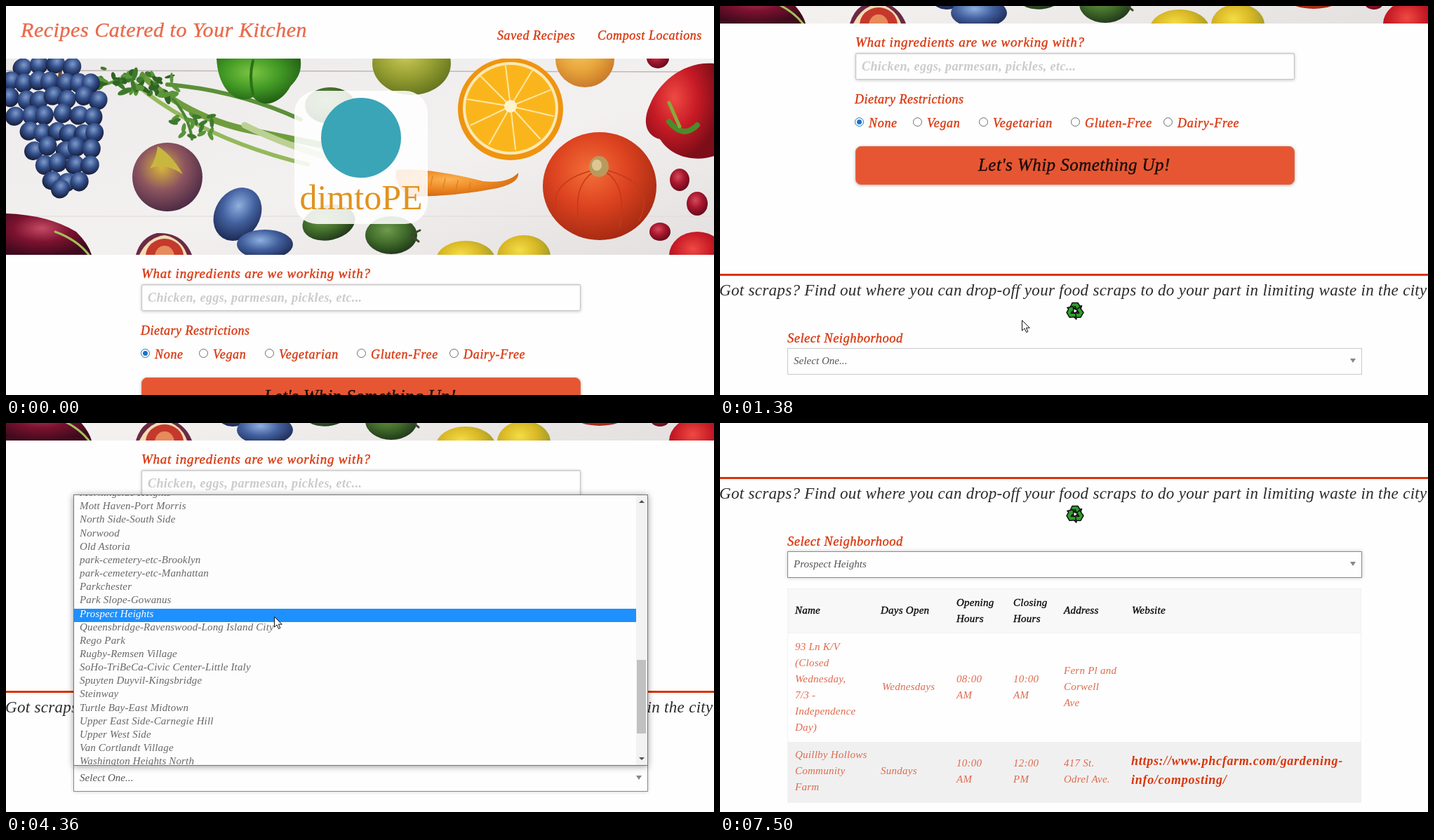
Animation of 1009x555 px, one loop 8.04 s. Source, as an HTML page:

```html
<!DOCTYPE html>
<html lang="en">
<head>
<meta charset="utf-8">
<title>Recipes Catered to Your Kitchen</title>
<style>
html, body { margin: 0; width: 100%; height: 100%; overflow: hidden; background: #fefefe; }
body { position: relative; font-family: "Liberation Serif", "Times New Roman", serif; font-style: italic; }
#page { position: absolute; left: 0; top: 0; width: 1009px; height: 1400px; }
#page > *, #list > *, #table > * { position: absolute; box-sizing: border-box; }
.t { line-height: 24px; white-space: pre; }
.mid { -webkit-text-stroke: .35px currentColor; }
.bold { font-weight: bold; }
#banner { left: 0; top: 75px; }
#field { left: 193px; top: 397px; width: 626px; height: 38px; border: 1px solid #c6c6c6; border-radius: 2px;
  background: #fefefe; box-shadow: inset 0 1px 2px rgba(10,10,10,.12), 0 1px 4px rgba(0,0,0,.22); }
#button { left: 193px; top: 530px; width: 626px; height: 55px; border-radius: 8px; background: #e75632;
  border: 1px solid #dc6a4c; box-shadow: 0 1px 4px rgba(0,0,0,.3); }
.radio { width: 13px; height: 13px; border: 1px solid #6b6b6b; border-radius: 50%; background: #fff; }
.radio.on { border-color: #1873c9; }
.radio.on::after { content: ""; position: absolute; inset: 2px; border-radius: 50%; background: #1873c9; }
#rule { left: 0; top: 712px; width: 1009px; height: 3px; background: #d93309; }
#select { left: 96px; top: 818px; width: 819px; height: 38px; border: 1px solid #cacaca; background: #fefefe; }
#select.focus { border-color: #8a8a8a; box-shadow: 0 0 5px #cacaca; }
#list { left: 96px; top: 432px; width: 819px; height: 387px; border: 1px solid #767676; background: #fff;
  overflow: hidden; box-shadow: 0 1px 9px rgba(0,0,0,.4); background: #fdfdfd; }
#rows { left: 0; top: 0; width: 801px; }
.row { height: 19.16px; padding-left: 8px; font-size: 15px; line-height: 15.5px; letter-spacing: .15px; color: #686868; white-space: pre; }
.row.hot { background: #1e90ff; color: #fff; }
#bar { right: 0; top: 0; width: 16px; height: 100%; background: #f2f2f2; }
#thumb { right: 2px; width: 13px; height: 105px; background: #c1c1c1; }
#table { left: 96px; top: 871px; width: 818px; height: 306px; border: 1px solid #f0f0f0; }
#head { left: 0; top: 0; width: 816px; height: 63px; background: #f8f8f8; border-bottom: 1px solid #f0f0f0; }
#band { left: 0; top: 218px; width: 816px; height: 86px; background: #f0f0f0; }
#cursor { position: absolute; left: 0; top: 0; overflow: visible; }
</style>
</head>
<body>
<div id="page">
  <svg id="banner" width="1009" height="280" viewBox="0 75 1009 280"></svg>
  <div id="field"></div>
  <div id="button"></div>
  <div id="rule"></div>
  <svg id="recycle" style="left:492px;top:751px" width="28" height="28" viewBox="-14 -14 28 28"></svg>
  <div id="select"></div>
  <svg style="left:898px;top:833px" width="8" height="6"><path d="M0 0h8L4 6z" fill="#868686"/></svg>
  <div id="table"><div id="head"></div><div id="band"></div></div>
</div>
<svg id="cursor" width="12" height="19"><path d="M.5 .5V15.2L4 12l2.6 5.6 2.3-1-2.5-5.4h4.9z" fill="#fff" stroke="#111"/></svg>
<script>
const $ = id => document.getElementById(id);
const page = $('page'), table = $('table');
const RED = '#d8350c', PALE = '#e06a4e';

function add(parent, cls, style = {}, text = '') {
  const el = document.createElement('div');
  el.className = cls;
  el.textContent = text;
  Object.assign(el.style, style);
  parent.append(el);
  return el;
}
// y is the middle of the capitals
const text = (x, y, str, size, gap, color, cls = 'mid', parent = page) =>
  add(parent, 't ' + cls, { left: x + 'px', top: y - 12 + 'px', fontSize: size + 'px', letterSpacing: gap + 'px', color }, str);

text(21, 34, 'Recipes Catered to Your Kitchen', 30, .55, '#e8694a');
text(700, 41.5, 'Saved Recipes', 18, .6, RED);
text(843, 41.5, 'Compost Locations', 18, .55, RED);
text(193, 381.5, 'What ingredients are we working with?', 19, .75, RED);
text(202, 415.5, 'Chicken, eggs, parmesan, pickles, etc...', 18, .4, '#cbcbcb', 'bold');
text(192, 463, 'Dietary Restrictions', 18, .5, RED);
[[192, 'None'], [275, 'Vegan'], [369, 'Vegetarian'], [500, 'Gluten-Free'], [632, 'Dairy-Free']].forEach(([x, s], i) => {
  add(page, i ? 'radio' : 'radio on', { left: x + 'px', top: '489px' });
  text(x + 20, 496.5, s, 18, .7, RED);
});
text(368, 557, "Let's Whip Something Up!", 25, .45, '#150c0a');
text(-1, 736, 'Got scraps? Find out where you can drop-off your food scraps to do your part in limiting waste in the city', 23, .31, '#2b2b2b', '');
text(96, 804, 'Select Neighborhood', 18.5, .5, RED);
const value = text(105, 836, '', 15, .05, '#555', '');

// table cells: x, middle of the cell, lines
const cells = (y, size, color, cls, list) => list.forEach(([x, str]) => {
  const lines = str.split('|');
  lines.forEach((s, i) => text(x - 97, y + (i - (lines.length - 1) / 2) * 23 - 237, s, size, .25, color, cls, table));
});
cells(267, 15, '#0a0a0a', 'mid', [[107, 'Name'], [229, 'Days Open'], [337, 'Opening|Hours'], [418, 'Closing|Hours'], [490, 'Address'], [587, 'Website']]);
cells(376, 15, PALE, '', [[107, '93 Ln K/V|(Closed|Wednesday,|7/3 -|Independence|Day)'], [231, 'Wednesdays'], [337, '08:00|AM'], [418, '10:00|AM'], [490, 'Fern Pl and|Corwell|Ave']]);
cells(496, 15, PALE, '', [[107, 'Quillby Hollows|Community|Farm'], [229, 'Sundays'], [337, '10:00|AM'], [418, '12:00|PM'], [490, '417 St.|Odrel Ave.']]);
const links = ['https://www.phcfarm.com/gardening-', 'info/composting/'].map((s, i) =>
  text(489, 245 + i * 26.5, s, 18, .72, RED, 'bold', table));

$('recycle').innerHTML = [0, 120, 240].map(a =>
  `<path transform="rotate(${a})" d="M-8 -3L-4 -11.5H4L7 -6.5 9.5 -7.5 7 1 -1 -3 1.5 -4 0 -6.5 -3 -1z" fill="#2f9e2c" stroke="#111" stroke-width="1.5" stroke-linejoin="round"/>`).join('');

// ---- banner ----
const tones = {
  grape: ['#7f9bc9', '#34508c', '#151b36'], plum: ['#8fb0e0', '#43619f', '#1e2b55'], fig: ['#d9b63c', '#8d5560', '#4b2a44'],
  pepper: ['#7cc544', '#439a25', '#1f5c14'], pear: ['#cdc95a', '#9aa334', '#66751f'], peach: ['#f4c55b', '#e9a63c', '#c97a2a'],
  red: ['#ee4a43', '#c81b26', '#7d0d18'], pumpkin: ['#f4703a', '#dd4320', '#a52a12'], berry: ['#d54a5c', '#a8162d', '#640a1a'],
  guava: ['#6f9a4e', '#45702d', '#20391a'], lemon: ['#f3dd45', '#d9b826', '#92952a'], beet: ['#c44a63', '#7d1230', '#3f0a1d'], carrot: ['#fbb254', '#ee8a25', '#cf6712']
};
const defs = Object.entries(tones).map(([id, c]) =>
  `<radialGradient id="${id}" cx=".42" cy=".36" r=".66">${c.map((k, i) => `<stop offset="${i / 2}" stop-color="${k}"/>`).join('')}</radialGradient>`).join('');
const oval = (x, y, rx, ry, tone, turn = 0) =>
  `<ellipse cx="${x}" cy="${y}" rx="${rx}" ry="${ry}" fill="${tone[0] == '#' ? tone : `url(#${tone})`}" transform="rotate(${turn} ${x} ${y})"/>`;
const shape = (d, tone) => `<path d="${d}" fill="${tone[0] == '#' ? tone : `url(#${tone})`}"/>`;
const line = (d, color, w) => `<path d="${d}" fill="none" stroke="${color}" stroke-width="${w}" stroke-linecap="round"/>`;
let seed = 7;
const rnd = () => (seed = seed * 16807 % 2147483647) / 2147483647;

let art = `<defs>${defs}<linearGradient id="wood" x2="1" y2="1"><stop stop-color="#eceaea"/><stop offset=".55" stop-color="#f3f1f0"/><stop offset="1" stop-color="#e3dfdf"/></linearGradient></defs>
<rect y="75" width="1009" height="280" fill="url(#wood)"/>`;
art += line('M0 92L1009 94', '#bdb8b5', 1.5) + line('M0 300H1009', '#dedad8', 1);
// celery and leaves
art += line('M195 100Q260 160 350 178T480 205', '#6f9d3d', 9) + line('M185 112Q280 190 430 226', '#94b95b', 6)
  + line('M230 112Q330 120 420 162', '#5b9038', 6) + line('M225 120Q260 150 265 190', '#4d8433', 4) + line('M340 170Q400 200 480 222', '#bcd094', 9);
for (let i = 0; i < 46; i++) {
  const a = rnd(), x = 135 + a * 110, y = 84 + rnd() * 34 + a * 14;
  art += oval(x, y, 4 + rnd() * 7, 2 + rnd() * 3, ['#3f7a2c', '#5a9539', '#2f6424'][i % 3], rnd() * 180);
}
for (let i = 0; i < 18; i++) art += oval(238 + rnd() * 56, 152 + rnd() * 34, 7, 3, i % 2 ? '#3f7a2c' : '#5a9539', rnd() * 180);
// grapes
art += line('M75 75Q82 95 70 120', '#6b4a32', 5);
[[86, 22, 92], [107, 6, 122], [131, 8, 130], [155, 12, 126], [179, 32, 128], [203, 42, 122], [227, 56, 118], [248, 66, 104], [259, 80, 84]].forEach(([y, a, b]) => {
  const n = Math.round((b - a) / 21);
  for (let i = 0; i <= n; i++) art += oval(a + (b - a) * i / Math.max(n, 1) + rnd() * 6 - 3, y + rnd() * 8 - 4, 13, 14, 'grape', rnd() * 60);
});
art += shape('M300 70C300 120 330 142 352 130C372 152 398 130 405 115C420 100 422 88 419 70Z', 'pepper') + line('M352 126Q346 100 352 78', '#2c7019', 4);
art += oval(578, 82, 56, 45, 'pear') + oval(462, 142, 36, 26, 'guava');
art += oval(825, 76, 42, 40, 'peach') + oval(929, 74, 16, 15, 'berry');
// orange half
art += oval(719, 147, 75, 73, '#ef9410') + oval(719, 146, 68, 66, '#fbe9b4') + oval(719, 146, 64, 62, '#fbb51c');
for (let i = 0; i < 10; i++) {
  const a = i * Math.PI / 5 + .2;
  art += line(`M719 143L${719 + 62 * Math.cos(a)} ${145 + 60 * Math.sin(a)}`, '#fde7a4', 2);
}
art += oval(719, 143, 9, 9, '#fff3cf');
art += shape('M1009 82C965 78 930 110 918 140C906 165 912 185 932 190C950 218 985 222 1009 214Z', 'red') + line('M945 165Q965 190 985 170', '#4d8a2c', 8) + line('M960 172L945 138', '#8aa83a', 5);
// fig, plums, beet and friends
art += oval(230, 244, 50, 49, 'fig') + shape('M205 232Q215 215 216 200Q236 212 252 240Q226 222 205 232Z', '#c9b640');
art += oval(330, 297, 32, 40, 'plum', 32) + oval(369, 340, 40, 21, 'plum');
art += shape('M0 296Q60 298 100 322Q118 340 122 355H0Z', 'beet') + line('M70 322Q102 334 118 355', '#a3c05d', 3);
art += shape('M185 355Q192 330 215 324Q252 322 265 355Z', '#6b2a44') + shape('M190 355Q202 330 226 327Q250 332 258 355Z', '#f2dcb4') + oval(226, 357, 27, 25, '#c4392c') + oval(226, 357, 14, 15, '#e78a5c');
art += oval(460, 309, 38, 25, 'guava', -12) + oval(549, 327, 37, 27, 'guava') + line('M578 326L590 320M578 328L588 336', '#3a4a2a', 3);
art += oval(655, 362, 42, 27, 'lemon') + oval(738, 357, 38, 30, 'lemon');
art += shape('M556 234Q600 230 680 250Q715 254 730 238Q732 252 700 260Q640 272 575 272Q552 255 556 234Z', 'carrot');
for (let i = 0; i < 5; i++) art += line(`M${590 + i * 18} ${240 + i * 3}l-3 14`, '#d87618', 1);
// pumpkin
art += oval(846, 257, 81, 77, 'pumpkin');
[-56, -28, 28, 56].forEach(d => art += line(`M846 232Q${846 + d * 1.5} 250 ${846 + d} ${326 - Math.abs(d) * .35}`, '#c23a19', 1.5));
art += oval(845, 229, 14, 15, '#b99a5c') + oval(842, 227, 7, 8, '#dcc794');
art += oval(960, 248, 14, 16, 'berry') + oval(985, 282, 15, 17, 'berry') + oval(932, 322, 15, 13, 'berry') + oval(985, 356, 40, 34, 'red');
// brand card
art += `<rect x="411" y="121" width="190" height="190" rx="32" fill="#fff" opacity=".87"/>` + oval(506, 188, 57, 57, '#3aa5b7');
art += `<text x="506" y="290" font-size="50" font-style="normal" text-anchor="middle" fill="#e0931f">dimtoPE</text>`;
$('banner').innerHTML = art;

// ---- drop-down ----
const places = ('Select One...|Astoria|Battery Park City-Lower Manhattan|Bay Ridge|Bellerose|Brooklyn Heights-Cobble Hill|Bushwick North|'
  + 'Carroll Gardens-Columbia Street-Red Hook|Central Harlem North-Polo Grounds|Central Harlem South|Chinatown|Clinton|Crown Heights North|'
  + 'Crown Heights South|East Concourse-Concourse Village|East Harlem North|East Harlem South|East New York|East Tremont|East Village|'
  + 'East Williamsburg|Elmhurst|Flatbush|Flushing|Fordham South|Forest Hills|Fort Greene|Glen Oaks|Gramercy|Greenpoint|Hamilton Heights|'
  + 'Highbridge|Hunts Point|Jackson Heights|Kensington|Kew Gardens|Lenox Hill|Lincoln Square|Longwood|Manhattanville|Midtown|'
  + 'Morningside Heights|Mott Haven-Port Morris|North Side-South Side|Norwood|Old Astoria|park-cemetery-etc-Brooklyn|'
  + 'park-cemetery-etc-Manhattan|Parkchester|Park Slope-Gowanus|Prospect Heights|Queensbridge-Ravenswood-Long Island City|Rego Park|'
  + 'Rugby-Remsen Village|SoHo-TriBeCa-Civic Center-Little Italy|Spuyten Duyvil-Kingsbridge|Steinway|Turtle Bay-East Midtown|'
  + 'Upper East Side-Carnegie Hill|Upper West Side|Van Cortlandt Village|Washington Heights North').split('|');
const ROW = 19.16, TOP = 103;
const list = add(page, '');
list.id = 'list';
const rowBox = add(list, '');
rowBox.id = 'rows';
const rows = places.map(s => add(rowBox, 'row', {}, s));
add(list, '').id = 'bar';
const thumb = add(list, '');
thumb.id = 'thumb';
const tip = d => list.insertAdjacentHTML('beforeend', `<svg style="left:805px;top:0" width="8" height="385"><path d="${d}" fill="#505050"/></svg>`);
tip('M0 11h8L4 7zM0 374h8L4 378z');

// ---- timing ----
const LOOP = 8040, OPEN = 1765, PICK = 4750, LEAVE = 7495;
// bursts of movement: start, end, steps
const bursts = [[210, 370, 3], [510, 990, 7], [1140, 1930, 11], [2010, 2480, 7], [2640, 2790, 3], [3190, 3490, 5],
  [3810, 4510, 10], [4750, 5380, 9], [5530, 5690, 3], [6010, 6790, 11], [6870, 6950, 2], [7180, 7500, 5]];
const scrollKeys = [[370, 0], [510, 15], [590, 59], [670, 130], [750, 210], [830, 275], [910, 315], [990, 330],
  [5065, 330], [5144, 334], [5222, 440], [5301, 575], [5380, 633], [5690, 635]];
const listKeys = [[2245, 0], [2323, 37.1], [2402, 180], [2480, 340], [2640, 480], [2715, 680], [2790, 796.3]];
const mouseKeys = [[210, 700, 424], [290, 632, 393], [370, 565, 364], [990, 565, 364], [1140, 550, 374], [1219, 505, 405], [1298, 458, 432],
  [1377, 430, 448], [1540, 402, 488], [1620, 395, 500], [1930, 395, 500], [2010, 399, 478], [2090, 403, 440], [2323, 411, 382], [2480, 418, 370],
  [2790, 420, 363], [3190, 412, 356], [3340, 340, 304], [3490, 335, 292], [3810, 337, 291], [4510, 395, 272], [4750, 395, 272],
  [5144, 417, 305], [5690, 417, 305], [6010, 395, 312], [6160, 260, 350], [6250, 200, 410], [6400, 330, 475], [6550, 600, 490],
  [6640, 610, 480], [6790, 462, 318], [6870, 540, 350], [6950, 611, 398], [7180, 640, 415], [7420, 951, 515]];

function snap(t) {
  let out = 0;
  for (const [a, b, n] of bursts) {
    const step = (b - a) / (n - 1), k = Math.floor((t - a) / step + .2);
    if (k >= 0) out = a + Math.min(k, n - 1) * step;
  }
  return out;
}
function at(keys, t) {
  const i = keys.findIndex(k => k[0] > t);
  if (i == 0) return keys[0].slice(1);
  if (i < 0) return keys[keys.length - 1].slice(1);
  const p = keys[i - 1], q = keys[i], f = (t - p[0]) / (q[0] - p[0]);
  return p.slice(1).map((v, j) => v + (q[j + 1] - v) * f);
}

function draw(now) {
  const t = snap(now % LOOP);
  const [scroll] = at(scrollKeys, t), [drop] = at(listKeys, t), [mx, my] = at(mouseKeys, t);
  const picked = t >= PICK, open = t >= OPEN && !picked;
  page.style.transform = `translateY(${-Math.round(scroll)}px)`;

  $('cursor').style.display = t >= 210 && t < LEAVE ? '' : 'none';
  $('cursor').style.transform = `translate(${Math.round(mx)}px,${Math.round(my)}px)`;

  list.style.display = open ? '' : 'none';
  rowBox.style.top = -drop + 'px';
  thumb.style.top = 17 + drop * 352 / 1287 + 'px';
  const hot = my > 488 ? 0 : Math.floor((my - TOP + drop) / ROW);
  rows.forEach((r, i) => r.classList.toggle('hot', i == hot));

  $('select').className = t >= OPEN ? 'focus' : '';
  value.textContent = picked ? 'Prospect Heights' : places[0];
  table.style.display = picked ? '' : 'none';
  const over = picked && mx > 586 && mx < 889 && my > 470 && my < 518 && t < LEAVE;
  links.forEach(l => l.style.color = over ? '#b92d0a' : RED);
}
const start = performance.now();
function tick() {
  draw(performance.now() - start);
  requestAnimationFrame(tick);
}
tick();
</script>
</body>
</html>
```
